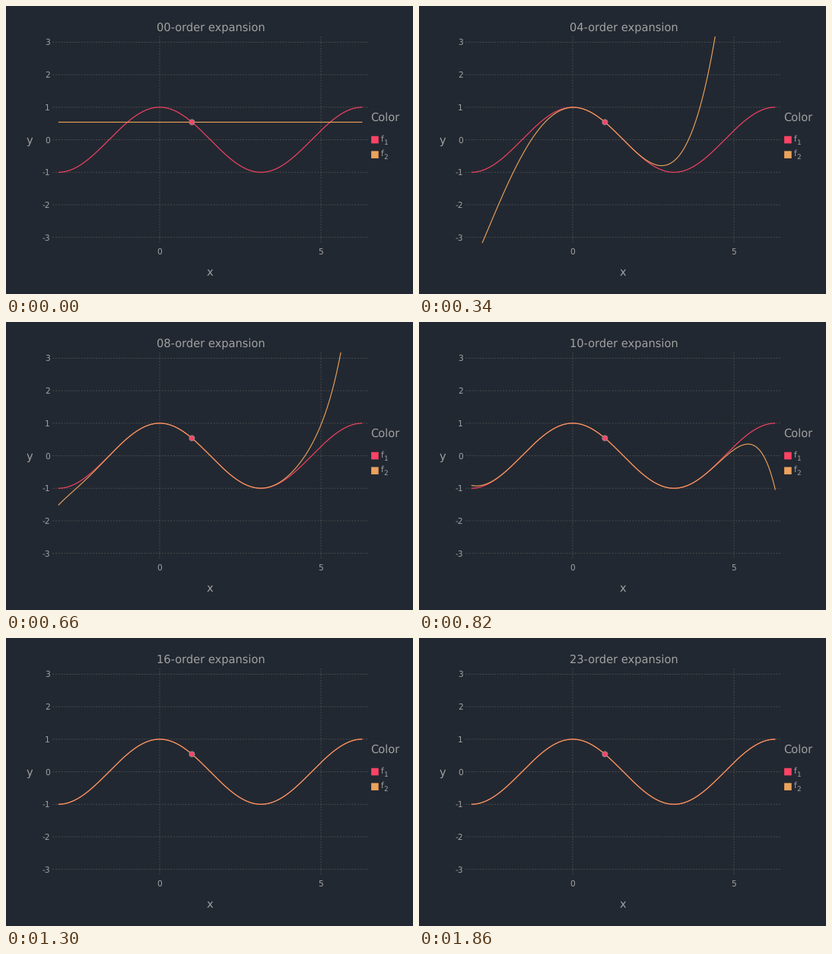
A matplotlib script for the animation above (1.94 s loop, 535x378 px).

```python
from math import cos, factorial, pi

import matplotlib.pyplot as plt
import numpy as np
from matplotlib.animation import FuncAnimation
from matplotlib.patches import Circle, Rectangle

W, H, DPI = 535, 378, 100
PX = 72 / DPI
MM = 96 / 25.4
BG, TEXT, GRID = "#222831", "#a1a1a1", "#575757"
PINK, ORANGE = "#fe4365", "#eca25c"
BIG, SMALL, SUB = 14.6, 10.67, 8.9
STEP = 20            # ms per tick
TICKS = 97           # 100 ms for order 0, then 80 ms for each of 23 orders
CENTER = 1.0

plt.rcParams["font.family"] = "DejaVu Sans"
plt.rcParams["text.hinting"] = "none"
fig = plt.figure(figsize=(W / DPI, H / DPI), dpi=DPI, facecolor=BG)
ax = fig.add_axes([0, 0, 1, 1])
ax.set_xlim(0, W)
ax.set_ylim(H, 0)
ax.axis("off")


def sx(x):
    return 202.0 + 42.4 * x


def sy(y):
    return 175.55 - 42.7 * y


# Panel reaches 2 mm beyond the data range
LEFT, RIGHT = sx(-pi) - 2 * MM, sx(2 * pi) + 2 * MM
TOP, BOTTOM = sy(3) - 2 * MM, sy(-3) + 2 * MM


def label(x, y, s, size, ha="center"):
    return ax.text(x, y, s, fontsize=size * PX, color=TEXT, ha=ha, va="baseline")


def grid_line(xs, ys):
    width = 0.2 * MM * PX
    ax.plot(xs, ys, color=GRID, lw=width, dashes=(2.5, 2.5),
            dash_capstyle="butt", snap=False, zorder=1)


def curve(color, z):
    line, = ax.plot([], [], color=color, lw=0.3 * MM * PX, snap=False, zorder=z,
                    solid_capstyle="butt")
    line.set_clip_path(panel)
    return line


def taylor(order):
    d = xs - CENTER
    return sum(cos(CENTER + k * pi / 2) / factorial(k) * d ** k
               for k in range(order + 1))


# Grid and axis labels
for v in range(-3, 4):
    grid_line([LEFT, RIGHT], [sy(v)] * 2)
    label(58, sy(v) + 3.8, str(v), SMALL, "right")
for v in (0, 5):
    grid_line([sx(v)] * 2, [TOP, BOTTOM])
    label(sx(v) - 0.2, 325.4, str(v), SMALL)
label(267.9, 354, "x", BIG)
label(31.2, 181, "y", BIG)
title = label(269, 33.2, "", BIG)

# Legend
label(479.6, 150.3, "Color", BIG, "left")
for i, color in enumerate((PINK, ORANGE)):
    y = 175.55 + 19.6 * i
    ax.add_patch(Rectangle((480.1, y - 4.8), 9.6, 9.6, fc=color, lw=0, snap=False))
    label(492.8, y + 2.1, "f", SMALL, "left")
    label(496.5, y + 6, str(i + 1), SUB, "left")

# Curves
panel = Rectangle((LEFT, TOP), RIGHT - LEFT, BOTTOM - TOP, fc="none", ec="none")
ax.add_patch(panel)
xs = np.linspace(-pi, 2 * pi, 400)
curve(PINK, 3).set_data(sx(xs), sy(np.cos(xs)))
approx = curve(ORANGE, 4)
ax.add_patch(Circle((sx(CENTER), sy(cos(CENTER))), 3.4, fc=PINK, ec="#a1808a",
                    lw=0.3 * MM * PX, zorder=5))


def draw(tick):
    order = 0 if tick < 5 else 1 + (tick - 5) // 4
    title.set_text(f"{order:02d}-order expansion")
    approx.set_data(sx(xs), sy(taylor(order) + 0 * xs))
    return title, approx


anim = FuncAnimation(fig, draw, frames=TICKS, interval=STEP, repeat=True,
                     repeat_delay=0)
plt.show()
```
